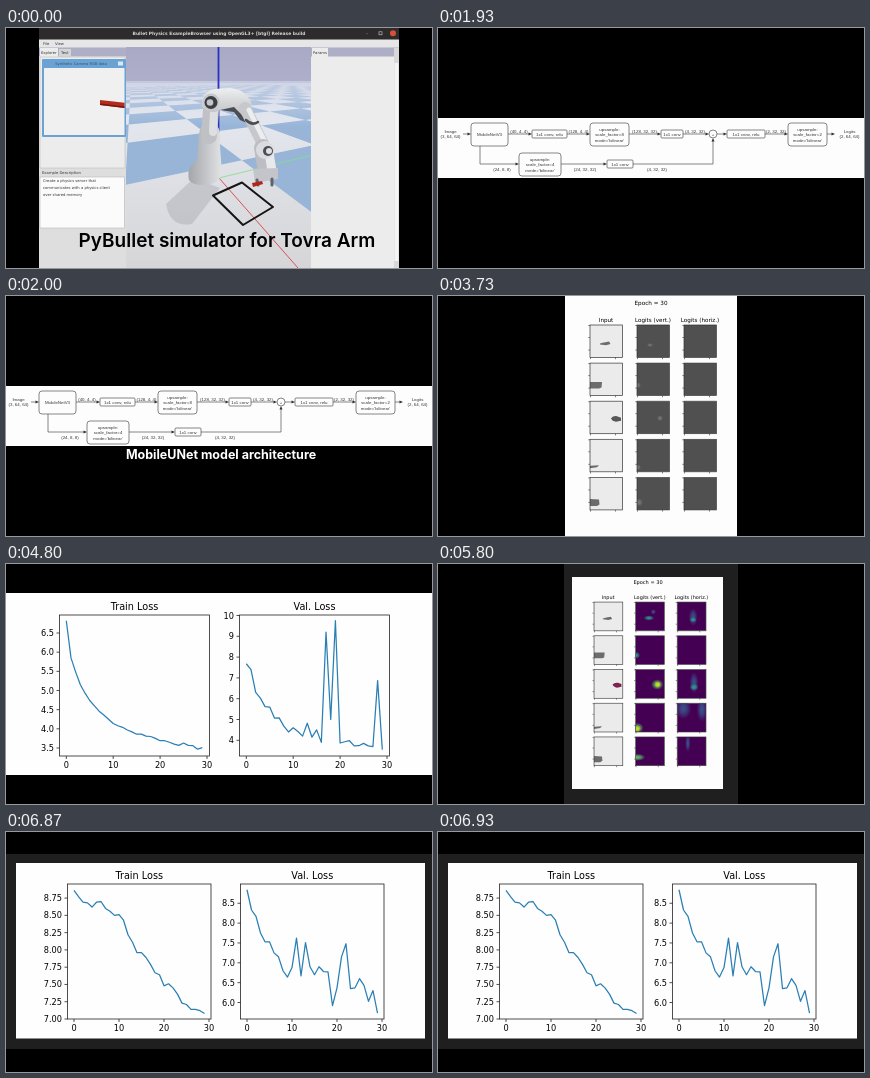
An HTML page for the animation above (8.07 s loop, 426x240 px).

```html
<!DOCTYPE html>
<html lang="en">
<head>
<meta charset="utf-8">
<title>Robot arm grasp learning</title>
<style>
html, body { margin: 0; width: 100%; height: 100%; overflow: hidden; background: #000; }
#stage { display: block; width: 100vw; height: 100vh; }
.scene { visibility: hidden; }
text { font-family: "DejaVu Sans", sans-serif; }
.mid { text-anchor: middle; }
.end { text-anchor: end; }
.cap { font: 600 19px Inter, sans-serif; text-anchor: middle; }
.sub { font-size: 12.5px; font-weight: 700; fill: #fff; }
.ui { font-size: 3.75px; fill: #333; }
.net text { font: 4.4px "Liberation Sans", Arial, sans-serif; text-anchor: middle; fill: #333; }
.net path, .net rect, .net circle { fill: none; stroke: #444; stroke-width: .65; }
.net .head { fill: #333; stroke: none; }
.axes { fill: none; stroke: #222; stroke-width: .8; }
.curve { fill: none; stroke: #2a7fb5; stroke-width: 1.25; stroke-linejoin: round; }
</style>
</head>
<body>
<svg id="stage" viewBox="0 0 426 240" preserveAspectRatio="none"></svg>
<script>
const LOOP = 8070;
const rect = (x, y, w, h, fill, more = '') =>
  `<rect x="${x}" y="${y}" width="${w}" height="${h}" fill="${fill}" ${more}/>`;
const text = (x, y, s, size, cls = 'mid', more = '') =>
  `<text x="${x}" y="${y}" class="${cls}" ${size ? `font-size="${size}"` : ''} ${more}>${s}</text>`;
const path = (d, more) => `<path d="${d}" ${more}/>`;
const dot = (x, y, r, fill) => `<circle cx="${x}" cy="${y}" r="${r}" fill="${fill}"/>`;
const limb = (d, w, color) =>
  path(d, `fill="none" stroke="${color}" stroke-width="${w}" stroke-linecap="round" stroke-linejoin="round"`);

const glow = { gray: '#777', blue: '#3b528b', teal: '#2a9d8c', green: '#5ec962', yellow: '#d8e219' };
const fade = (id, from, to, down = true) =>
  `<linearGradient id="${id}" ${down ? 'x2="0" y2="1"' : ''}><stop stop-color="${from}"/><stop offset="1" stop-color="${to}"/></linearGradient>`;
const defs = '<defs>' + Object.entries(glow).map(([id, c]) =>
  `<radialGradient id="${id}"><stop stop-color="${c}"/><stop offset=".4" stop-color="${c}" stop-opacity=".75"/>
   <stop offset="1" stop-color="${c}" stop-opacity="0"/></radialGradient>`).join('') +
  fade('sky', '#a9a9c6', '#c9cfe2') + fade('ground', '#e6eaf2', '#d6d6d8') +
  fade('haze', '#c9cfe2d0', '#dbe1ee00') + fade('shell', '#a3a5a9', '#e2e3e5', false) +
  fade('dome', '#eeeff0', '#b4b6ba') + '</defs>';

// Ground plane in perspective: u runs along the red axis, v along the green one
function project(u, v) {
  const z = Math.max(.3, 2.24 - .908 * u + .419 * v);
  const x = .419 * u + .908 * v;
  return [213 + 190 * x / z, 50 + 224 / z];
}
function floor() {
  const size = 1.5;
  let d = '';
  for (let i = -17; i < 3; i++) for (let j = -14; j < 15; j++) {
    if ((i + j) % 2 === 0) continue;
    const u = i * size - .3, v = j * size - 1;
    if (2.24 - .908 * u + .419 * (v + size) < 1.1) continue;
    const quad = [[u, v], [u + size, v], [u + size, v + size], [u, v + size]];
    d += 'M' + quad.map(p => project(...p).map(n => n.toFixed(1)).join(' ')).join('L') + 'Z';
  }
  return rect(120, 55, 185, 185, 'url(#ground)') + path(d, 'fill="#98b5d8"') + rect(120, 53, 185, 45, 'url(#haze)');
}

function robot() {
  return path('M188 150L160 176Q164 200 186 196L214 160Z', 'fill="#85888f" opacity=".28"') +
    path('M183 152Q180 140 191 133L193 106Q194 97 201 95L211 97Q216 105 214 118L216 146Q212 157 197 157Q186 157 183 152Z', 'fill="url(#shell)"') +
    limb('M203 108L205 82', 16, '#bfc1c5') + limb('M207 104L208 82', 8, '#dedfe2') +
    path('M196 78Q195 64 209 61L224 60Q239 61 245 74Q248 86 243 93Q235 92 229 83L214 82Q203 88 196 78Z', 'fill="url(#dome)"') +
    path('M214 82L228 79L237 88L243 96L234 92L228 84Z', 'fill="#4a4d52"') +
    dot(205, 74, 8.5, '#c6c8cc') + dot(205, 74.5, 6.5, '#3a3d42') + dot(204, 74.5, 3.3, '#c4c6ca') +
    limb('M239 80L256 114', 12, '#c6c8cc') + limb('M243 82L258 112', 5, '#ecedef') +
    limb('M240 92Q246 98 252 94', 2.5, '#4a4d52') +
    limb('M257 120L261 143', 18, '#bcbec3') + limb('M262 118L266 143', 9, '#e8e9eb') +
    dot(259, 122, 9, '#d9dbde') + dot(262, 123, 5, '#4a4d52') + dot(263, 123, 3, '#dfe0e3') +
    path('M247 141L272 140L272 151L249 155Z', 'fill="#c3c5ca"') +
    limb('M251 152L252 157M266 151L266 157', 3, '#60646a') +
    path('M246 155L256 153L257 156L247 159Z', 'fill="#b3241a"');
}

function simulator() {
  const world = `<svg x="120" y="19" width="185" height="221" viewBox="120 19 185 221">` +
    rect(120, 19, 185, 221, 'url(#sky)') + floor() +
    limb('M213 150L305 127.5', .8, '#7fe08a') + limb('M213 150L292 240', 1, '#d8505a') +
    limb('M212.5 19V150', 1.8, '#2b30c4') + robot() +
    path('M207 167.500L236 154.500L267 179L237 197Z', 'fill="none" stroke="#151515" stroke-width="2" stroke-linejoin="round"') +
    '</svg>';
  const ui = (x, y, s) => text(x, y, s, 0, 'ui');
  const strip = '#aeaec6';
  return rect(33, 0, 360, 240, '#e6e6e6') + rect(33, 0, 360, 11.500, '#2d2b2c') +
    text(213, 7.200, 'Bullet Physics ExampleBrowser using OpenGL3+ [btgl] Release build', 4.46, 'mid', 'fill="#d6d6d6" font-weight="700"') +
    text(361, 7, '–', 4, 'mid', 'fill="#ccc"') + rect(373, 3.800, 3, 3, 'none', 'stroke="#ccc" stroke-width=".6"') +
    dot(387, 5.200, 3, '#d9503a') +
    ui(37, 17, 'File') + ui(49, 17, 'View') +
    rect(33, 19.500, 87, 9, strip) + rect(33, 28.500, 87, 211.500, '#dedede') +
    rect(34, 20, 18, 9, '#ececec') + rect(53, 21, 12, 8, '#d5d5d5') +
    ui(35, 25.800, 'Explorer') + ui(55, 25.800, 'Test') +
    rect(34, 29, 85, 111, '#ececec', 'stroke="#b5b5b5" stroke-width=".5"') +
    rect(36, 31, 84, 78, '#6aa3d3', 'rx="1"') + rect(38, 40, 80.500, 67, '#f0f0f1') +
    text(75, 36.800, 'Synthetic Camera RGB data', 3.7, 'mid', 'fill="#31526f"') + rect(112, 33.500, 5, 4, '#d9e8f5') +
    path('M94 72L118.500 74.800V80L94 77Z', 'fill="#b42a1d"') + path('M94 75.500L118.500 78.500V80L94 77Z', 'fill="#75180f"') +
    ui(36, 145.500, 'Example Description') +
    rect(34, 149, 84.500, 51, '#fbfbfb', 'stroke="#aaa" stroke-width=".5"') +
    ui(37, 154.300, 'Create a physics server that') + ui(37, 161.300, 'communicates with a physics client') + ui(37, 168.300, 'over shared memory') +
    world + rect(305, 19.500, 88, 9.500, strip) + rect(305, 28.500, 88, 211.500, '#ececec') + rect(306, 20, 16, 9, '#ececec') +
    ui(307, 25.800, 'Params') + rect(388, 20, 5, 220, '#d8d8d8') +
    rect(388.500, 35, 4, 198, '#f4f4f4') +
    text(221, 218.500, 'PyBullet simulator for Tovra Arm', 0, 'cap');
}

function network() {
  const box = (x, y, w, h, ...lines) => rect(x, y, w, h, 'none', `rx="${h > 10 ? 3 : 1}"`) +
    lines.map((s, k) => text(x + w / 2, y + h / 2 + 1.600 + (k - (lines.length - 1) / 2) * 5.500, s)).join('');
  const up = (x, y, w, n) => box(x, y, w, 23, 'upsample:', 'scale_factor=' + n, "mode='bilinear'");
  const arrow = (a, b, y) => path(`M${a} ${y}H${b - 2}`) + path(`M${b} ${y}l-3.500 -1.500v3Z`, 'class="head"');
  const shapes = [[81, 104.5, '(40, 4, 4)'], [140.5, 104.5, '(128, 4, 4)'], [206.5, 104.5, '(128, 32, 32)'],
    [257, 104.5, '(4, 32, 32)'], [338, 104.5, '(2, 32, 32)'], [64, 143, '(24, 8, 8)'], [147, 143, '(24, 32, 32)'],
    [219, 143, '(4, 32, 32)'], [12.5, 104.5, 'Image'], [12.5, 110, '(3, 64, 64)'], [411.5, 104.5, 'Logits'], [411.5, 110, '(2, 64, 64)']];
  return '<rect y="90" width="426" height="60" fill="#fdfdfd"/><g class="net">' +
    box(33, 95, 37, 23, 'MobileNetV3') + box(94, 102, 35, 8, '1x1 conv, relu') + up(152, 95, 39, 8) +
    box(223, 102, 22, 8, '1x1 conv') + box(289, 102, 38, 8, '1x1 conv, relu') + up(350, 95, 39, 2) +
    up(81, 125, 42, 4) + box(169, 132, 26, 8, '1x1 conv') +
    '<circle cx="275" cy="106" r="4"/>' + text(275, 107.600, '+') +
    [[25, 33], [70, 94], [129, 152], [191, 223], [245, 271], [279, 289], [327, 350], [389, 397]].map(([a, b]) => arrow(a, b, 106)).join('') +
    path('M42 118V136') + arrow(42, 81, 136) + arrow(123, 169, 136) +
    path('M195 136H275V112') + path('M275 110l-1.500 3.500h3Z', 'class="head"') +
    shapes.map(s => text(...s)).join('') + '</g>';
}

// Heat spots: row, column, x, y, rx, ry, colour
const faint = c => [[0, 0, 13, 20, 3, 2, c], [1, 0, 1, 22, 3, 3, c], [2, 0, 23, 17, 3, 3, c], [3, 0, 1, 28, 3, 3, c], [4, 0, 2, 25, 4, 4, c]];
const strong = [
  [0, 0, 15, 18, 6, 3, 'teal'], [0, 0, 20, 11, 3, 3, 'blue'], [1, 0, 1, 22, 4, 4, 'teal'],
  [2, 0, 24.5, 17, 7, 6, 'green'], [2, 0, 25, 17, 4, 4, 'yellow'],
  [3, 0, 2, 28, 7, 6, 'green'], [3, 0, 2, 29, 4, 4, 'yellow'], [4, 0, 2, 23, 9, 4, 'green'],
  [0, 1, 18, 17, 5, 10, 'blue'], [0, 1, 18, 20, 4, 3, 'teal'], [2, 1, 19, 15, 5, 12, 'blue'], [2, 1, 19, 20, 5, 4, 'teal'],
  [3, 1, 7, 6, 9, 12, 'blue'], [3, 1, 28, 7, 6, 14, 'blue'], [4, 1, 12, 7, 3, 10, 'blue']];
const things = ['M10 18.500L14 17.500L19 16.500L20.500 19L16 20.300L10 19.500Z', 'M0 19H12L11.500 24.500L9 25.500H0Z',
  'M21 17Q23 14.500 27 15L31 16.500V19.500L26 20.500Q22 20 21 17Z', 'M0 26.500L9 26L7 28L0 29Z', 'M0 21.500L9 22L9.500 27L7 28.500H0Z'];

function samples(heat, spots, third = '#585858') {
  const cell = (x, y, fill, inner) => `<svg x="${x}" y="${y}" width="32.500" height="32.500">${rect(0, 0, 32.5, 32.5, fill)}${inner}</svg>` +
    rect(x, y, 32.5, 32.5, 'none', 'stroke="#333" stroke-width=".7"') +
    path(`M${x} ${y + .5}h-1.700M${x} ${y + 12.5}h-1.700M${x} ${y + 25}h-1.700M${x + .5} ${y + 32.5}v1.700M${x + 25.5} ${y + 32.5}v1.700`, 'stroke="#333" stroke-width=".6"');
  let out = text(213, 9, 'Epoch = 30', 5.7) + text(168, 25.500, 'Input', 5.6) +
    text(215, 25.500, 'Logits (vert.)', 5.6) + text(262, 25.500, 'Logits (horiz.)', 5.6);
  things.forEach((d, row) => {
    const y = 29 + row * 38.1;
    out += cell(152, y, '#ebebeb', path(d, `fill="${row === 2 ? third : '#6c6c6c'}"`));
    for (let col = 0; col < 2; col++) {
      const hot = spots.filter(s => s[0] === row && s[1] === col).map(([, , cx, cy, rx, ry, c]) =>
        `<ellipse cx="${cx}" cy="${cy}" rx="${rx}" ry="${ry}" fill="url(#${c})"/>`).join('');
      out += cell(199 + col * 47, y, heat, hot);
    }
  });
  return out;
}
const page = (...args) => rect(127, 0, 172, 240, '#fdfdfd') + samples(...args);

// x, y, w, h: axes box; x0, dx: place of 0 and width of one epoch; ref, yRef, dy: value scale
function chart({ title, x, y, w, h, x0, dx, ref, yRef, dy, from, to, step, digits, data }) {
  const py = v => yRef - (v - ref) * dy;
  let ticks = '', labels = '';
  for (let n = 0; n <= 30; n += 10) {
    ticks += `M${x0 + n * dx} ${y + h}v3`;
    labels += text(x0 + n * dx, y + h + 12, n, 8.2);
  }
  for (let v = from; v <= to; v += step) {
    ticks += `M${x} ${py(v)}h-3`;
    labels += text(x - 5.500, py(v) + 3, v.toFixed(digits), 8.2, 'end');
  }
  const line = data.map((v, n) => `${(x0 + n * dx).toFixed(2)} ${py(v).toFixed(2)}`).join('L');
  return rect(x, y, w, h, 'none', 'class="axes"') + path(ticks, 'class="axes"') + labels +
    text(x + w / 2, y - 5, title, 9.7) + path('M' + line, 'class="curve"');
}

const firstLoss = () => rect(0, 29, 426, 182, '#fefefe') +
  chart({ title: 'Train Loss', x: 53.5, y: 51, w: 150, h: 141, x0: 60.3, dx: 4.69, ref: 3.5, yRef: 184, dy: 38.33, from: 3.5, to: 6.5, step: .5, digits: 1,
    data: [6.82, 5.85, 5.48, 5.15, 4.93, 4.74, 4.6, 4.46, 4.36, 4.25, 4.14, 4.08, 4.04, 3.97, 3.92,
      3.86, 3.86, 3.81, 3.8, 3.75, 3.69, 3.69, 3.65, 3.6, 3.57, 3.63, 3.57, 3.56, 3.47, 3.51] }) +
  chart({ title: 'Val. Loss', x: 233.5, y: 51, w: 150, h: 141, x0: 240.3, dx: 4.69, ref: 4, yRef: 176.3, dy: 20.8, from: 4, to: 10, step: 1, digits: 0,
    data: [7.68, 7.4, 6.3, 6.03, 5.62, 5.6, 5.07, 5.08, 4.68, 4.4, 4.6, 4.42, 4.2, 4.82, 4.15,
      4.5, 3.9, 9.2, 5, 9.75, 3.87, 3.93, 3.98, 3.73, 3.74, 3.85, 3.73, 3.7, 6.87, 3.55] });

const secondLoss = () => rect(0, 22, 426, 195, '#1f1f1f') + rect(10, 31, 409, 175.500, '#fefefe') +
  chart({ title: 'Train Loss', x: 61.5, y: 52, w: 143.5, h: 135, x0: 68, dx: 4.5, ref: 7, yRef: 187, dy: 69.1, from: 7, to: 8.75, step: .25, digits: 2,
    data: [8.86, 8.77, 8.69, 8.68, 8.62, 8.69, 8.7, 8.6, 8.56, 8.5, 8.51, 8.43, 8.22, 8.11, 7.96,
      7.96, 7.89, 7.79, 7.67, 7.64, 7.48, 7.51, 7.45, 7.36, 7.23, 7.21, 7.14, 7.14, 7.12, 7.08] }) +
  chart({ title: 'Val. Loss', x: 234.5, y: 52, w: 143.5, h: 135, x0: 241, dx: 4.5, ref: 6, yRef: 170.5, dy: 39.7, from: 6, to: 8.5, step: .5, digits: 1,
    data: [8.84, 8.33, 8.17, 7.75, 7.53, 7.53, 7.25, 7.15, 6.8, 6.64, 6.88, 7.62, 6.67, 7.51, 6.9,
      6.7, 6.9, 6.78, 6.77, 5.92, 6.37, 7.15, 7.48, 6.35, 6.37, 6.6, 6.43, 6.03, 6.3, 5.73] });

const secondPage = () => rect(126, 0, 174, 240, '#1f1f1f') + rect(134, 13, 151, 212, '#fdfdfd') +
  `<g transform="translate(21.500 12.400) scale(.885)">${samples('#440154', strong, '#7d2450')}</g>`;

// Start, end (ms), content
const scenes = [
  [0, 1930, simulator()],
  [1930, 3730, network()],
  [2000, 3730, text(215, 163, 'MobileUNet model architecture', 0, 'cap sub')],
  [3730, 3800, page('#505050', faint('gray'))],
  [3800, 4730, page('#440154', faint('blue'))],
  [4730, 5800, firstLoss()],
  [5800, 6870, secondPage()],
  [6870, LOOP, secondLoss()]
];
const pct = t => (Math.max(0, t / LOOP * 100 - (t < LOOP ? .0005 : 0))).toFixed(4) + '%';
const css = scenes.map(([a, b], n) =>
  `@keyframes show${n} { 0% { visibility: hidden } ${pct(a)} { visibility: visible } ${pct(b)} { visibility: hidden } }
   #s${n} { animation: show${n} ${LOOP}ms step-end infinite }`).join('\n');
document.head.appendChild(document.createElement('style')).textContent = css;
document.getElementById('stage').innerHTML = defs +
  scenes.map(([, , body], n) => `<g id="s${n}" class="scene">${body}</g>`).join('');
</script>
</body>
</html>
```
